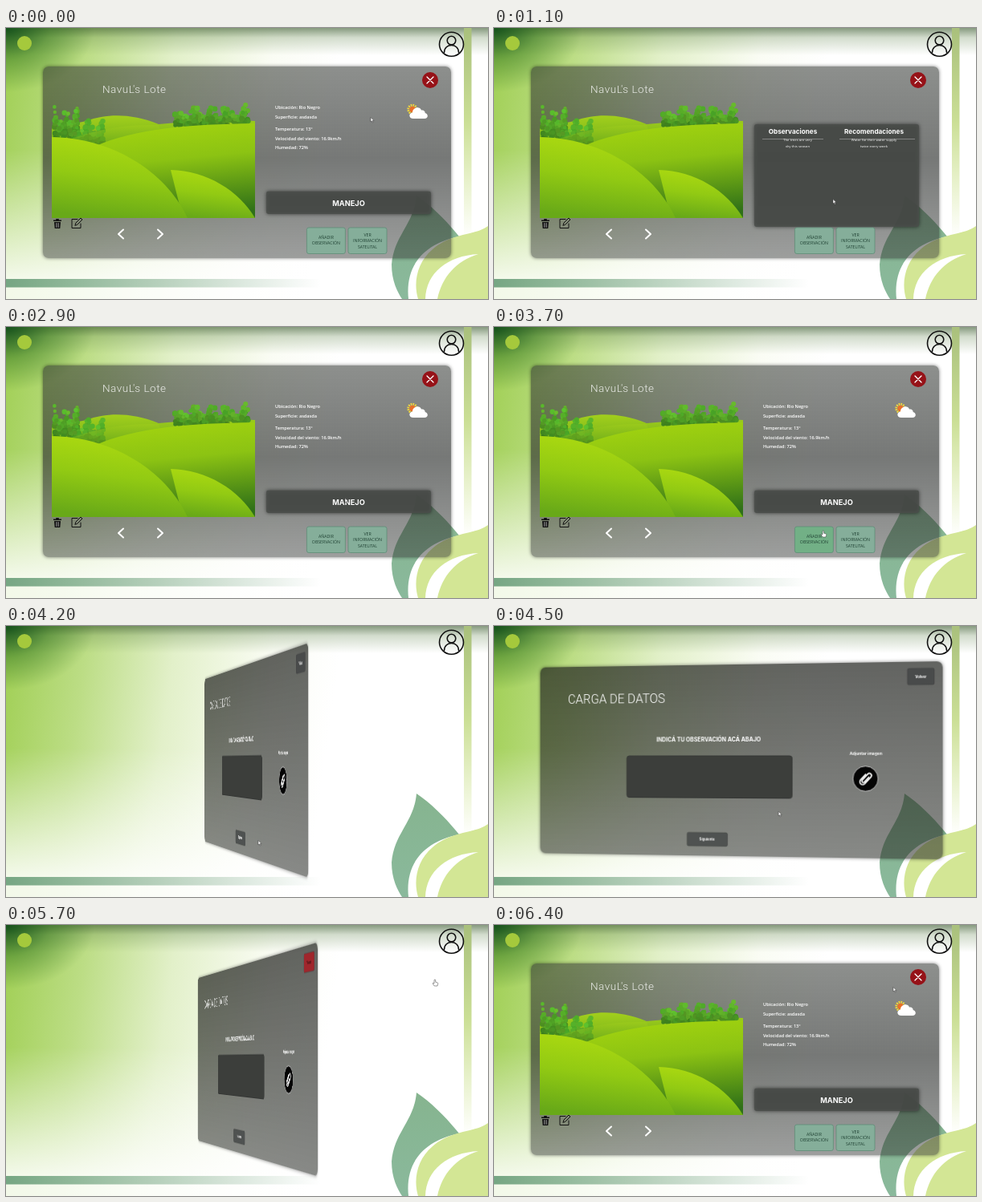
An HTML page that plays this animation: 600 by 338 pixels, repeating every 6500 ms.

```html
<!DOCTYPE html>
<html lang="es">
<head>
<meta charset="utf-8">
<style>
html, body { margin: 0; width: 600px; height: 338px; overflow: hidden; background: #fff; }
#stage { position: relative; width: 600px; height: 338px; overflow: hidden; }
#stage > svg { position: absolute; left: 0; top: 0; }
#back-drop { position: absolute; inset: 0; background:
  radial-gradient(ellipse 110px 80px at 0 0, rgba(8,72,22,.85), rgba(30,100,25,.4) 50%, transparent),
  linear-gradient(rgba(60,92,48,.62), rgba(95,130,75,.28) 12px, transparent 34px),
  linear-gradient(transparent 45%, rgba(255,255,255,.85) 92%),
  linear-gradient(98deg, #a0cf54, #bcdd85 16%, #e2f0c9 33%, #fafcf4 52%, #fff 65%); }
#scene, #card, .face { position: absolute; width: 508px; height: 239px; }
#scene { left: 46px; top: 48px; perspective: 1350px; }
#card { transform-style: preserve-3d; }
.face { backface-visibility: hidden; border-radius: 7px; box-shadow: 0 0 4px rgba(0,0,0,.5); }
.face svg { display: block; }
#front { background: linear-gradient(rgba(52,56,52,.56), rgba(45,48,46,.65) 48%, rgba(55,58,56,.49)); }
#rear { background: linear-gradient(rgba(32,34,30,.7), rgba(45,48,43,.57)); transform: rotateY(180deg); }
text { fill: #fff; font-family: "Open Sans", sans-serif; }
.thin { font-family: Roboto, sans-serif; font-weight: 300; }
.bold { font-family: Inter, sans-serif; font-weight: 700; }
.mid { text-anchor: middle; }
.info { font-size: 5.6px; font-weight: 600; }
.small text { font-size: 5.2px; fill: #1f4032; text-anchor: middle; }
.line { fill: none; stroke-linecap: round; stroke-linejoin: round; }
</style>
</head>
<body>
<div id="stage">
  <div id="back-drop"></div>
  <svg width="600" height="338">
    <defs>
      <linearGradient id="bar"><stop stop-color="#76a683"/><stop offset="1" stop-color="#76a683" stop-opacity="0"/></linearGradient>
      <linearGradient id="post" x2="0" y2="1"><stop stop-color="#a9c07c"/><stop offset=".45" stop-color="#cbdf96"/><stop offset="1" stop-color="#d3e695" stop-opacity="0"/></linearGradient>
      <linearGradient id="leaf" x2="0" y2="1"><stop stop-color="#86b48f"/><stop offset="1" stop-color="#8ab99c"/></linearGradient>
    </defs>
    <rect y="313" width="392" height="10.5" fill="url(#bar)"/>
    <rect x="570" width="9.5" height="262" fill="url(#post)"/>
    <path fill="url(#leaf)" d="M511 209C508 245 483 258 480 295C480 315 487 329 493 338H501C497 300 516 270 564 260C548 240 530 222 511 209Z"/>
    <path fill="#d3e695" d="M600 247C584 259 555 255 531 276C511 293 507 318 513 338H600Z"/>
    <path fill="#fff" d="M522 338C523 305 550 284 588 282C560 291 543 310 537 338Z"/>
    <circle cx="23" cy="19" r="9" fill="#a5c93c"/>
    <g class="line" stroke="#111" stroke-width="1.6">
      <circle cx="554.5" cy="20.3" r="15"/>
      <circle cx="554.5" cy="15.6" r="5.3"/>
      <path d="M545.5 30.5C545.5 18.5 563.5 18.5 563.5 30.5"/>
    </g>
  </svg>
  <div id="scene"><div id="card">
    <div class="face" id="front"><svg width="508" height="239" viewBox="46 48 508 239">
      <defs>
        <linearGradient id="far" x2="0" y2="1"><stop stop-color="#a2cf1c"/><stop offset="1" stop-color="#63a51a"/></linearGradient>
        <linearGradient id="wide" x1=".4" x2=".6" y2="1"><stop stop-color="#a3d40f"/><stop offset=".4" stop-color="#8cc313"/><stop offset="1" stop-color="#2f7018"/></linearGradient>
        <linearGradient id="near" x1=".6" y1="0" x2=".4" y2="1"><stop stop-color="#aedb10"/><stop offset=".5" stop-color="#92ca13"/><stop offset="1" stop-color="#68a918"/></linearGradient>
        <clipPath id="photo"><path d="M57 88H310V237H57Z"/></clipPath>
      </defs>
      <text class="thin" x="120" y="81" font-size="13.5" letter-spacing=".5" opacity=".85">NavuL's Lote</text>
      <g clip-path="url(#photo)">
        <path fill="url(#far)" d="M100 116C125 107 155 106 190 120L260 114L310 116V160H57V125Z"/>
        <g id="bushes"></g>
        <path fill="url(#far)" d="M57 146C95 134 125 120 190 121L200 150H57Z" opacity=".45"/>
        <path fill="url(#wide)" d="M112 147C160 126 225 120 310 119V237H57V150Z"/>
        <path fill="url(#near)" d="M205 177C250 178 290 203 310 237H220Z"/>
        <path fill="url(#near)" d="M57 136C130 137 198 177 226 237H57Z"/>
      </g>
      <g fill="#111">
        <path d="M59 239.5H69V241H59ZM62.2 238H65.8V239.5H62.2ZM60 242H68L67.3 250H60.7Z"/>
        <path class="line" stroke="#999" stroke-width=".7" d="M62.5 243.5V248.5M64 243.5V248.5M65.5 243.5V248.5"/>
      </g>
      <path class="line" stroke="#111" d="M89 238.5H82V249.5H93V244M86 246L87 243L93 237L95 239L89 245Z"/>
      <path class="line" stroke="#fff" stroke-width="2" d="M146 251.5L140 257L146 262.5M189 251.5L195 257L189 262.5"/>
      <circle cx="528" cy="65" r="10" fill="#961218"/>
      <path class="line" stroke="#fff" stroke-width="1.3" d="M524 61L532 69M532 61L524 69"/>
      <g id="info">
        <g class="info">
          <text x="335" y="101">Ubicación: Rio Negro</text>
          <text x="335" y="112.6">Superficie: asdasda</text>
          <text x="335" y="128">Temperatura: 13°</text>
          <text x="335" y="139.6">Velocidad del viento: 16.9km/h</text>
          <text x="335" y="151">Humedad: 72%</text>
        </g>
        <circle cx="506" cy="101.5" r="5.2" fill="none" stroke="#f3d83c" stroke-width="3" stroke-dasharray="1.6 1.1"/>
        <circle cx="506" cy="101.5" r="3.7" fill="#e8702a"/>
        <path fill="#fff" d="M507 113C501 113 501 106 506 105.5C506 99 515 97 517 102.5C521 102 522 105 521.5 106C526 107 526 113 521 113Z"/>
      </g>
      <g style="filter:drop-shadow(0 0 2.5px rgba(0,0,0,.65))">
        <svg id="box" x="324" width="205">
          <rect width="100%" height="100%" rx="3" fill="#4b4e4b" fill-opacity=".88"/>
          <g id="notes">
            <text class="bold mid" x="48" y="12" font-size="8.2">Observaciones</text>
            <text class="bold mid" x="149" y="12" font-size="8.2">Recomendaciones</text>
            <path stroke="#aaa" stroke-width=".6" d="M10 18.5H86M106 18.5H200"/>
            <g class="mid" font-size="4.3">
              <text x="54" y="21">The trees are very</text><text x="149" y="21">Water for their water supply</text>
              <text x="54" y="29">dry this season</text><text x="149" y="29">twice every week</text>
            </g>
          </g>
          <text id="manejo" class="bold mid" x="102.5" y="18.9" font-size="9.2">MANEJO</text>
        </svg>
      </g>
      <g class="small" stroke-width=".8">
        <rect id="add" x="374.4" y="249" width="48" height="32.5" rx="2.5" stroke="#5f8d78"/>
        <rect x="426" y="249" width="48" height="32.5" rx="2.5" fill="#85ae9a" stroke="#5f8d78"/>
        <g stroke="none">
          <text x="398.4" y="263.2">AÑADIR</text><text x="398.4" y="270.4">OBSERVACIÓN</text>
          <text x="450" y="259.5">VER</text><text x="450" y="267">INFORMACIÓN</text><text x="450" y="274.5">SATELITAL</text>
        </g>
      </g>
    </svg></div>
    <div class="face" id="rear"><svg width="508" height="239" viewBox="46 48 508 239">
      <text class="thin" x="83" y="95" font-size="16">CARGA DE DATOS</text>
      <text class="bold mid" x="266" y="144" font-size="7.1">INDICÁ TU OBSERVACIÓN ACÁ ABAJO</text>
      <rect x="161" y="162" width="210.5" height="52.5" rx="3" fill="#3c3e3b" stroke="#343634"/>
      <text class="bold mid" x="462" y="161" font-size="4.9">Adjuntar imagen</text>
      <circle cx="461.5" cy="190" r="15.3" fill="#050505" stroke="#ddd" stroke-width=".8"/>
      <path class="line" stroke="#fff" stroke-width="1.6" transform="rotate(42 461.5 190)" d="M458 186V195A3.5 3.5 0 0 0 465 195V184A2.6 2.6 0 0 0 459.8 184V194A1.7 1.7 0 0 0 463.2 194V186"/>
      <rect x="239" y="258" width="51.5" height="17" rx="2" fill="#4f5251" stroke="#454746" stroke-width=".6"/>
      <text class="bold mid" x="264.5" y="268.2" font-size="4.3">Siguiente</text>
      <rect id="exit" x="512" y="56" width="32" height="20" rx="2" stroke="#444" stroke-width=".6"/>
      <text id="exitText" class="bold mid" x="528" y="67.7" font-size="4.3">Volver</text>
    </svg></div>
  </div></div>
  <svg width="600" height="338">
    <g id="cursor" fill="#fff" stroke="#333" stroke-width=".5">
      <path id="arrow" d="M0 -2.5V3L1.3 1.9L2.2 4L3.1 3.6L2.2 1.6H4Z"/>
      <path id="hand" d="M-1 -3.5Q0 -4.5 .7 -3.5V-.8L3 -.2Q4 .2 3.7 1.5L3 4H-.8L-3 .8Q-2.8 -.3 -1 1Z"/>
    </g>
  </svg>
</div>
<script>
const LOOP = 6500, STEP = 100;
const $ = id => document.getElementById(id);
const smooth = x => x * x * (3 - 2 * x);

// Eased value between [time, value] stops
function key(t, ...stops) {
  if (t <= stops[0][0]) return stops[0][1];
  for (let i = 1; i < stops.length; i++) {
    const [a, from] = stops[i - 1], [b, to] = stops[i];
    if (t <= b) return from + (to - from) * smooth((t - a) / (b - a));
  }
  return stops.at(-1)[1];
}

// CSS "ease" curve: cubic-bezier(.25, .1, .25, 1)
function ease(x) {
  if (x <= 0) return 0;
  if (x >= 1) return 1;
  let lo = 0, hi = 1;
  for (let i = 0; i < 20; i++) {
    const s = (lo + hi) / 2, u = 1 - s;
    if (.75 * u * s + s ** 3 < x) lo = s; else hi = s;
  }
  return .3 * (1 - lo) ** 2 * lo + 3 * (1 - lo) * lo * lo + lo ** 3;
}

let seed = 7;
const rand = () => (seed = seed * 16807 % 2147483647) / 2147483647;

// Rounded clumps, dark at the foot and light at the crown
function bush(left, right, base, height) {
  let clumps = '';
  for (let i = 0; i < 130; i++) {
    const u = rand(), x = left + u * (right - left);
    const v = i < 60 ? rand() * .6 : rand();
    const y = base - v * height * (.75 + .25 * Math.cos(u * 13));
    clumps += `<circle cx="${x}" cy="${y}" r="${2 + rand() * 1.6}" fill="hsl(${94 + rand() * 10} 62% ${29 + v * 13 + rand() * 6}%)"/>`;
  }
  return clumps;
}
$('bushes').innerHTML = bush(60, 90, 138, 40) + bush(84, 122, 145, 32) + bush(210, 262, 122, 24) + bush(250, 302, 122, 27);

function draw(t) {
  const turn = 180 * (ease((t - 3932) / 800) - ease((t - 5500) / 800));
  $('card').style.transform = `rotateY(${turn}deg)`;

  const top = key(t, [700, 203.5], [1100, 120], [1900, 120], [2200, 173], [2500, 203.5]);
  const bottom = key(t, [700, 232], [1100, 248], [1900, 248], [2200, 195], [2500, 232]);
  $('box').setAttribute('y', top);
  $('box').setAttribute('height', bottom - top);
  const shown = key(t, [700, 1], [1100, 0], [2100, 0], [2600, 1]);
  $('info').style.opacity = shown;
  $('info').setAttribute('transform', `translate(0 ${25 * (1 - shown)})`);
  $('manejo').style.opacity = key(t, [700, 1], [900, 0], [2250, 0], [2500, 1]);
  $('notes').style.opacity = key(t, [750, 0], [1000, 1], [2200, 1], [2400, 0]);

  const overAdd = t >= 3400 && t < 4000, overExit = t >= 4850 && t < 6200;
  $('add').setAttribute('fill', overAdd ? '#72b086' : '#85ae9a');
  $('exit').setAttribute('fill', overExit ? '#a0262c' : '#494b4b');
  $('exitText').style.fill = overExit ? '#3a1113' : '#fff';

  const x = key(t, [0, 454], [700, 422], [3000, 422], [3500, 410], [3850, 410], [4200, 314], [4350, 314], [4900, 534], [6000, 534], [6400, 497]);
  const y = key(t, [0, 114], [700, 216], [3000, 216], [3500, 258], [3850, 258], [4200, 270], [4350, 270], [4900, 72], [6000, 72], [6400, 80]);
  $('cursor').setAttribute('transform', `translate(${x} ${y})`);
  const pointing = overAdd || t >= 4850 && t < 6000;
  $('hand').style.display = pointing ? '' : 'none';
  $('arrow').style.display = pointing ? 'none' : '';
}

const start = performance.now();
function tick() {
  const t = (performance.now() - start) % LOOP;
  draw(Math.floor(t / STEP) * STEP);
  requestAnimationFrame(tick);
}
draw(0);
requestAnimationFrame(tick);
</script>
</body>
</html>
```
